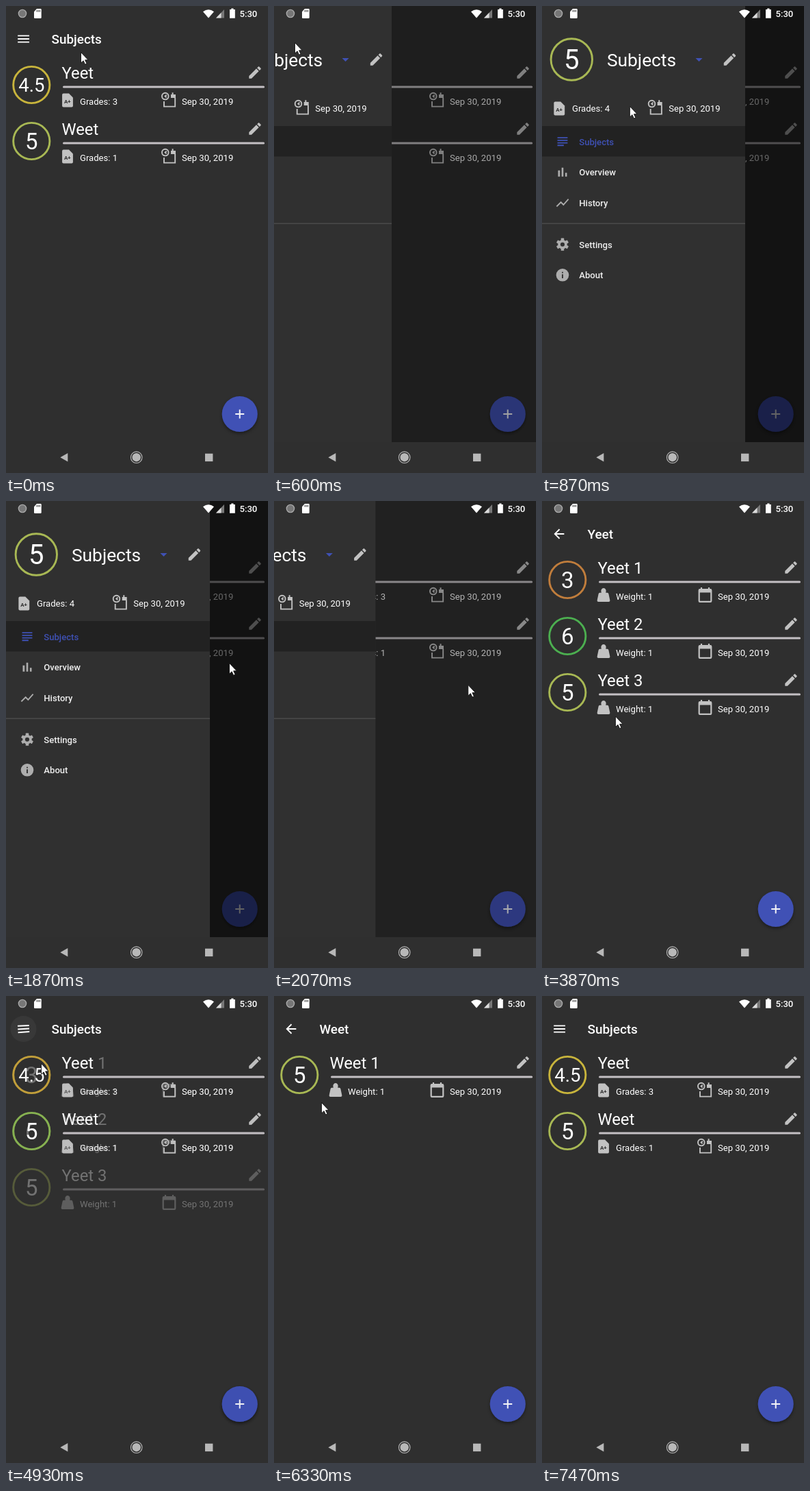
Recreate the animation shown at these times as an HTML page. Size 383 px wide and 681 px high, loop 8140 ms.

```html
<!DOCTYPE html>
<html lang="en">
<head>
<meta charset="utf-8">
<title>Grades app</title>
<style>
  html, body { margin: 0; width: 100%; height: 100%; overflow: hidden; background: #2f2f2f; }
  svg { display: block; width: 383px; height: 681px; font-family: Roboto, sans-serif; fill: #fff; }
</style>
</head>
<body>
<svg id="stage" viewBox="0 0 383 681"></svg>
<script>
const LOOP = 8140, STEP = 1000 / 15;
const BG = '#2f2f2f', BLUE = '#3f51b5', ICON = '#c2c2c2';
const RING = { 3: '#c07d3c', 4.5: '#c8b43c', 5: '#a8b854', 6: '#4caf50' };

const text = (x, y, size, str, extra = '') =>
  `<text x="${x}" y="${y}" font-size="${size}" ${extra}>${str}</text>`;

// Icons on a 24 unit grid, centred on x, y
const icon = (x, y, body, sx = 1, sy = sx, fill = ICON) =>
  `<g transform="translate(${x} ${y}) scale(${sx} ${sy}) translate(-12 -12)" fill="${fill}">${body}</g>`;
const shape = d => `<path d="${d}"/>`;

const PENCIL = shape('M3 17.25V21h3.75L17.81 9.94l-3.75-3.75zM20.71 7.04c.39-.39.39-1.02 0-1.41l-2.34-2.34c-.39-.39-1.02-.39-1.41 0l-1.83 1.83 3.75 3.75z');
const SHEET = shape('M14 2H6a2 2 0 0 0-2 2v16a2 2 0 0 0 2 2h12a2 2 0 0 0 2-2V8z') +
  text(11.8, 16.8, 8, 'A+', `text-anchor="middle" font-weight="700" fill="${BG}"`);
const WEIGHT = shape('M12 3a4 4 0 0 1 3.5 6H18a2 2 0 0 1 1.95 1.56l2 8A2 2 0 0 1 20 21H4a2 2 0 0 1-1.95-2.44l2-8A2 2 0 0 1 6 9h2.5A4 4 0 0 1 12 3z');
const CALENDAR = shape('M19 3h-1V1h-2v2H8V1H6v2H5a2 2 0 0 0-2 2v14a2 2 0 0 0 2 2h14a2 2 0 0 0 2-2V5a2 2 0 0 0-2-2zm0 16H5V8h14z');
const CLOCK = `<g fill="none" stroke="${ICON}" stroke-width="1.9">
  <circle cx="6.8" cy="6.6" r="4.8"/><path d="M8.8 4.6L6.6 6.6l2 1.8M5 14v7.6h16.2V9"/></g>` +
  shape('M15 4h1.6V1.2h2V4h3.4v5h-7z');
const SUBJECT = shape('M14 17H4v2h10zM20 9H4v2h16zM4 15h16v-2H4zM4 5v2h16V5z');
const BARS = shape('M5 9.2h3V19H5zM10.6 5h2.8v14h-2.8zM16.2 13H19v6h-2.8z');
const TREND = shape('M3.5 18.5l6-6 4 4L22 6.9l-1.4-1.4-7.1 8-4-4L2 17z');
const GEAR = '<circle cx="12" cy="12" r="5.3" fill="none" stroke="#adadad" stroke-width="4"/>' +
  [0, 60, 120, 180, 240, 300].map(a => `<rect x="9.6" y="2.2" width="4.8" height="4" rx=".6" transform="rotate(${a} 12 12)"/>`).join('');
const INFO = `<circle cx="12" cy="12" r="10"/><path d="M11 7h2v2h-2zM11 11h2v6h-2z" fill="${BG}"/>`;

const ring = (x, y, r, grade, size) =>
  `<circle cx="${x}" cy="${y}" r="${r}" fill="none" stroke="${RING[grade]}" stroke-width="2.9"/>` +
  text(x, y + size * .357, size, grade, 'text-anchor="middle"');

function row(i, name, grade, count) {
  const isSubject = count !== undefined;
  return `<g transform="translate(0 ${i * 82})">
    ${ring(37.3, 115, 26.6, grade, grade === 4.5 ? 27.5 : 33)}
    ${text(81.5, 105.5, 23.8, name)}
    <rect x="83" y="116.4" width="295" height="3" rx="1.5" fill="#c4c0c4"/>
    ${icon(364, 97, PENCIL, .97)}
    ${isSubject ? icon(90, 137.5, SHEET, .99) : icon(90, 137, WEIGHT, .93, 1.1)}
    ${isSubject ? icon(238, 137, CLOCK) : icon(238.5, 138, CALENDAR, 1.1)}
    ${text(108, 144, 13.1, isSubject ? 'Grades: ' + count : 'Weight: 1')}
    ${text(257, 144, 13.1, 'Sep 30, 2019')}</g>`;
}

const FAB = `<circle cx="341.7" cy="595" r="26" fill="${BLUE}" filter="url(#shadow)"/>
  <path d="M335.2 595h13M341.7 588.5v13" stroke="#f4f4f8" stroke-width="2"/>`;
const page = (id, rows, extra = '') => `<g id="${id}">${extra}${rows.join('')}${FAB}</g>`;

const item = (y, label, glyph, color = '#adadad', textColor = '#eee') =>
  icon(31, y, glyph, .93, .93, color) +
  text(55.3, y + 4.8, 13.1, label, `font-weight="500" fill="${textColor}"`);

const stage = document.getElementById('stage');
stage.innerHTML = `
<defs><filter id="shadow" x="-30%" y="-30%" width="160%" height="170%">
  <feDropShadow dx="0" dy="2.5" stdDeviation="2.2" flood-color="#000" flood-opacity=".4"/></filter></defs>
<rect width="383" height="681" fill="${BG}"/>
<circle id="touch" cx="25.5" cy="48" r="19"/>
<path id="burger" fill="none" stroke="#fff" stroke-width="1.9"/>
${text(66.5, 55.3, 18.9, '', 'id="title" font-weight="500"')}
<g id="pages">
  ${page('list', [row(0, 'Yeet', 4.5, 3), row(1, 'Weet', 5, 1)],
    '<rect id="press" width="383" height="81.5" fill-opacity=".035"/><circle id="ripple" fill-opacity=".07"/>')}
  ${page('yeet', [row(0, 'Yeet 1', 3), row(1, 'Yeet 2', 6), row(2, 'Yeet 3', 5)])}
  ${page('weet', [row(0, 'Weet 1', 5)])}
</g>
<rect id="scrim" width="383" height="636" fill="#000"/>
<g id="drawer">
  <rect width="298" height="636" fill="#303030"/>
  ${ring(44.3, 78, 30.2, 5, 40)}
  ${text(96, 88, 26.3, 'Subjects')}
  <path d="M225.5 76h10l-5 5z" fill="${BLUE}"/>
  ${icon(275.5, 78, PENCIL, .97)}
  ${icon(26.3, 149.5, SHEET, .99)}${text(45, 154, 13.1, 'Grades: 4')}
  ${icon(166.7, 148, CLOCK)}${text(186.3, 154, 13.1, 'Sep 30, 2019')}
  <rect y="175" width="298" height="44.5" fill="#222"/>
  ${item(197.7, 'Subjects', SUBJECT, BLUE, BLUE)}
  ${item(242.3, 'Overview', BARS)}
  ${item(287, 'History', TREND)}
  <rect y="316.5" width="298" height="1.5" fill="#4a4a4a"/>
  ${item(347.7, 'Settings', GEAR)}
  ${item(392.3, 'About', INFO)}
</g>
<g id="status">
  <circle cx="24" cy="11" r="5.6" fill="#777" stroke="#aaa" stroke-width="1.4"/>
  <path d="M45 4h5.5q1.2 0 1.2 1.2v11.6q0 1.2-1.2 1.2h-8.3q-1.2 0-1.2-1.2V8.2z"/>
  <path d="M45.2 6v2.6M47.3 6v2.6M49.4 6v2.6" stroke="${BG}" stroke-width="1"/>
  <path d="M288 8.3Q296 2.2 304 8.3L296 17.5z"/>
  <path d="M307 17.5h12V5z" fill="#777"/><path d="M307 17.5h7.5V9.8z" fill="#ddd"/>
  <path d="M329.3 3.5h3.2v1.6h2.3v12.6h-7.8V5.1h2.3z"/>
  ${text(341.5, 16, 13.1, '5:30', 'font-weight="500"')}
</g>
<g fill="#b8b8b8">
  <path d="M79.3 658.2l11-6.2v12.4z"/>
  <circle cx="190.7" cy="658.2" r="6.2"/>
  <circle cx="190.7" cy="658.2" r="8.3" fill="none" stroke="#b8b8b8" stroke-width="1.1"/>
  <rect x="291" y="652.7" width="11.4" height="11.4"/>
</g>
<path id="cursor" d="M.5.5v15.6l3.6-3.3 2.5 5.4 2.5-1.1-2.5-5.3h4.6z" stroke="#111" stroke-width=".9"/>`;

const $ = Object.fromEntries([...stage.querySelectorAll('[id]')].map(e => [e.id, e]));
const set = (el, attrs) => { for (const k in attrs) el.setAttribute(k, attrs[k]); };
const clamp = v => Math.max(0, Math.min(1, v));
const lerp = (a, b, p) => a + (b - a) * p;

// at: first visible moment; icon and fade: when each animation starts
const START = { at: -1e4, icon: -1e4, fade: -1e4, to: 'list', title: 'Subjects' };
const NAVS = [START,
  { at: 2930, icon: 2815, fade: 2893, to: 'yeet', title: 'Yeet', row: 0, x: 162, y: 114 },
  { at: 4660, icon: 4660, fade: 4753, to: 'list', title: 'Subjects' },
  { at: 5530, icon: 5415, fade: 5493, to: 'weet', title: 'Weet', row: 1, x: 97, y: 200 },
  { at: 6995, icon: 6990, fade: 7075, to: 'list', title: 'Subjects' }];

const CURSOR = [[0, 109, 67], [333, 30, 53], [667, 30, 53], [867, 128, 146], [1200, 230, 215],
  [1800, 326, 236], [1935, 326, 236], [2200, 240, 300], [2467, 162, 115], [3130, 162, 115],
  [3800, 117, 344], [4467, 16, 39], [4733, 16, 39], [4933, 51, 98], [5267, 97, 200],
  [6267, 97, 200], [6333, 69, 155], [6600, 29, 58], [7130, 29, 58], [7400, -16, 70]];

function cursorAt(t) {
  const i = CURSOR.findIndex(k => k[0] > t);
  if (i < 0) return CURSOR[CURSOR.length - 1].slice(1);
  const a = CURSOR[i - 1], b = CURSOR[i], p = (t - a[0]) / (b[0] - a[0]);
  return [lerp(a[1], b[1], p), lerp(a[2], b[2], p)];
}

const settle = (t, start) => 1 - (1 - clamp((t - start) / 512)) ** 5;

function drawBurger(p, mirrored) {
  const angle = p * Math.PI / 4, half = lerp(16.8, 14.9, p) / 2, cut = .66 * p;
  const bar = lerp(16.8, 10.5, p), w = bar * Math.cos(angle), h = bar * Math.sin(angle);
  const gap = lerp(4.66, -.66, p), turn = (180 * p - 180) * (mirrored ? -1 : 1);
  set($.burger, {
    d: `M${cut - half} 0H${half - cut}M${-half} ${gap}l${w} ${h}M${-half} ${-gap}l${w} ${-h}`,
    transform: `translate(25.6 48) rotate(${turn})`
  });
}

function draw(t) {
  const n = NAVS.findLastIndex(v => t >= v.at);
  const nav = NAVS[n], from = n ? NAVS[n - 1].to : 'weet';
  const back = nav.to === 'list';

  const u = clamp((t - nav.icon) / 300), p = .5 - Math.cos(u * Math.PI) / 2;
  drawBurger(back ? 1 - p : p, back);
  $.title.textContent = nav.title;

  // The leaving page stays above the arriving one
  const f = clamp((t - nav.fade) / 220);
  for (const id of ['list', 'yeet', 'weet']) $[id].setAttribute('opacity', 0);
  $[nav.to].setAttribute('opacity', 1 - (1 - f) ** 2);
  $[from].setAttribute('opacity', 1 - f * f);
  $.pages.append($[nav.to], $[from]);

  const pressed = back ? 0 : 1;
  set($.press, { opacity: pressed, y: 74.5 + 82 * (nav.row || 0) });
  set($.ripple, { opacity: pressed, cx: nav.x || 0, cy: nav.y || 0, r: 10 + Math.max(0, t - nav.at) * .25 });
  const touch = [500, 4660, 6995].map(s => t < s ? 0 : 1 - clamp((t - s - 270) / 130));
  $.touch.setAttribute('fill-opacity', .045 * Math.max(...touch));

  const open = settle(t, 519) - settle(t, 2000);
  $.scrim.setAttribute('opacity', .6 * open);
  $.drawer.setAttribute('transform', `translate(${298 * (open - 1)} 0)`);

  $.cursor.setAttribute('transform', `translate(${cursorAt(t)})`);
}

function frame() {
  const t = performance.now() % LOOP;
  draw(Math.floor((t + 5) / STEP) * STEP);
  requestAnimationFrame(frame);
}
frame();
</script>
</body>
</html>
```
